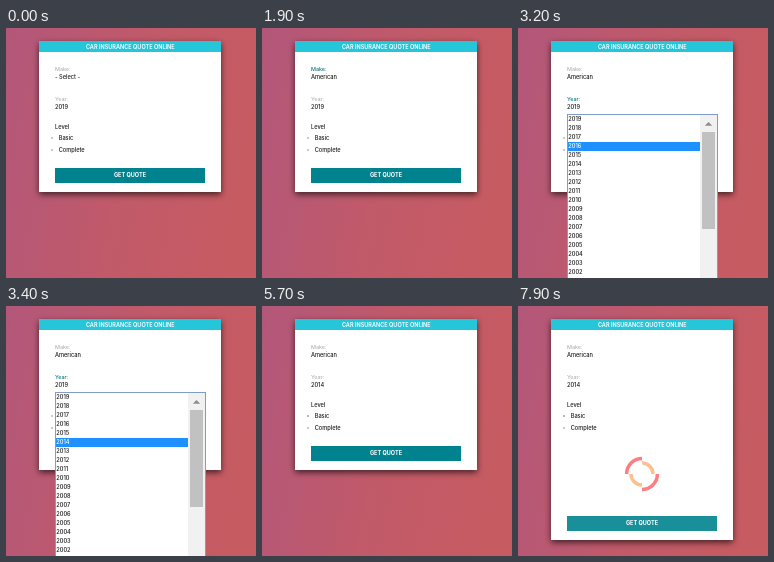
Animation, 250 px wide and 250 px high, one loop 8 s. Source, as an HTML page:

```html
<!DOCTYPE html>
<html lang="en">
<head>
<meta charset="utf-8">
<title>Quote form</title>
<style>
  html, body { margin: 0; width: 100%; height: 100%; overflow: hidden; }
  svg { display: block; width: 100vw; height: 100vh; }
  text { font: 500 5.65px Inter, "Open Sans", sans-serif; fill: #1c1c1c; }
  .caps { font-size: 5.55px; font-weight: 600; fill: #fff; text-anchor: middle; }
  .bold { font-weight: 700; }
  .label { font-size: 5.4px; }
</style>
</head>
<body>
<svg viewBox="0 0 250 250">
  <defs>
    <linearGradient id="bg" x1="0" y1="0.1" x2="1" y2="0.3">
      <stop offset="0" stop-color="#b3577a"/>
      <stop offset="0.55" stop-color="#c15a69"/>
      <stop offset="1" stop-color="#c65b62"/>
    </linearGradient>
    <filter id="shadow" x="-10%" y="-10%" width="120%" height="125%">
      <feDropShadow dx="0" dy="2.5" stdDeviation="3" flood-color="#000" flood-opacity="0.65"/>
    </filter>
    <clipPath id="slot"><rect id="slotRect" x="33" y="140" width="182"/></clipPath>
  </defs>

  <rect width="250" height="250" fill="url(#bg)"/>
  <rect id="card" x="33" y="13" width="182" fill="#fff" filter="url(#shadow)"/>
  <rect x="33" y="13" width="182" height="11" fill="#26c6da"/>
  <text class="caps" x="124.3" y="21">CAR INSURANCE QUOTE ONLINE</text>

  <text class="label" id="makeLabel" x="49" y="43">Make:</text>
  <text id="make" x="49" y="51"></text>
  <text class="label" id="yearLabel" x="49" y="73">Year:</text>
  <text id="year" x="49" y="81"></text>

  <text x="49" y="101">Level</text>
  <circle id="basic" cx="46" cy="110" r="1.1"/>
  <text x="52.7" y="112">Basic</text>
  <circle cx="46" cy="122" r="1.1" fill="#bbb"/>
  <text x="52.7" y="124">Complete</text>

  <g clip-path="url(#slot)">
    <g transform="translate(124 168)" fill="none" stroke-width="3.5">
      <circle id="outer" r="15.4" stroke="#ff7c81" pathLength="4" stroke-dasharray="1"/>
      <circle id="inner" r="11" stroke="#fac090" pathLength="4" stroke-dasharray="1" stroke-dashoffset="1"/>
    </g>
  </g>
  <g id="button">
    <rect x="49" y="140" width="150" height="15" fill="#00838f"/>
    <text class="caps bold" x="124" y="149.3">GET QUOTE</text>
  </g>

  <g id="makeList"></g>
  <g id="yearList"></g>
</svg>

<script>
const LOOP = 8000, STEP = 100, ROW = 9;
const NS = "http://www.w3.org/2000/svg";
const $ = id => document.getElementById(id);
const clamp = v => Math.max(0, Math.min(1, v));
const during = (t, from, to) => t >= from && t < to;

function add(parent, tag, attrs, content = "") {
  const el = document.createElementNS(NS, tag);
  for (const key in attrs) el.setAttribute(key, attrs[key]);
  el.textContent = content;
  parent.appendChild(el);
  return el;
}

// Builds a native-looking option list and returns its update function.
function dropdown(id, top, options) {
  const group = $(id);
  add(group, "rect", {
    x: 49.5, y: top - 0.5, width: 150, height: options.length * ROW + 1,
    fill: "#fff", stroke: "#7f9bc8"
  });
  const bar = add(group, "rect", { x: 50, height: ROW, fill: "#1e90ff" });
  const rows = options.map((name, i) =>
    add(group, "text", { x: 50.3, y: top + i * ROW + 6.4 }, name));
  return (open, selected) => {
    group.style.display = open ? "" : "none";
    bar.setAttribute("y", top + selected * ROW);
    rows.forEach((row, i) => row.style.fill = i === selected ? "#fff" : "");
    return bar;
  };
}

const years = Array.from({ length: 20 }, (_, i) => String(2019 - i));
const showMakes = dropdown("makeList", 57, ["- Select -", "American", "Asian", "European"]);
const showYears = dropdown("yearList", 87, years);
showMakes(false, 0).setAttribute("width", 149);
showYears(false, 0).setAttribute("width", 132);

const yearList = $("yearList");
add(yearList, "rect", { x: 182, y: 87, width: 17, height: 180, fill: "#f1f1f1" });
add(yearList, "rect", { x: 184, y: 104, width: 13, height: 97, fill: "#c1c1c1" });
add(yearList, "path", { d: "M186.8 97.8 L190.5 94 L194.2 97.8 Z", fill: "#8c8c8c" });

// Reaches 1 after the given number of steps, the first already visible at start.
const fade = (t, start, steps) => clamp((t - start + STEP) / (steps * STEP));

function labelColor(focus) {
  const mix = (a, b) => Math.round(a + (b - a) * focus);
  return `rgb(${mix(178, 8)},${mix(178, 118)},${mix(178, 126)})`;
}

function draw(time) {
  const t = Math.floor(time / STEP) * STEP;

  $("makeLabel").style.fill = labelColor(fade(t, 900, 2) - fade(t, 2700, 2));
  $("yearLabel").style.fill = labelColor(fade(t, 2700, 1) - fade(t, 5500, 3));
  $("make").textContent = t < 1900 ? "- Select -" : "American";
  $("year").textContent = t < 4100 ? "2019" : "2014";
  $("basic").setAttribute("fill", t < 5700 ? "#bbb" : "#a4a4a4");

  showMakes(during(t, 900, 1900), t < 1300 ? 0 : 1);
  showYears(during(t, 2700, 4100), Math.round(5 * clamp((t - 3000) / 400)));

  const p = clamp((t - 7500) / 400);
  const grow = 70 * (0.5 - Math.cos(Math.PI * p) / 2);
  $("card").setAttribute("height", 151 + grow);
  $("slotRect").setAttribute("height", grow);
  $("button").setAttribute("transform", `translate(0 ${grow})`);
  $("button").setAttribute("opacity", p > 0 ? 0.9 : 1);

  const angle = (t - 7900) * 0.36;
  $("outer").setAttribute("transform", `rotate(${angle})`);
  $("inner").setAttribute("transform", `rotate(${-angle})`);
}

const begin = performance.now();
function tick() {
  draw((performance.now() - begin) % LOOP);
  requestAnimationFrame(tick);
}
tick();
</script>
</body>
</html>
```
